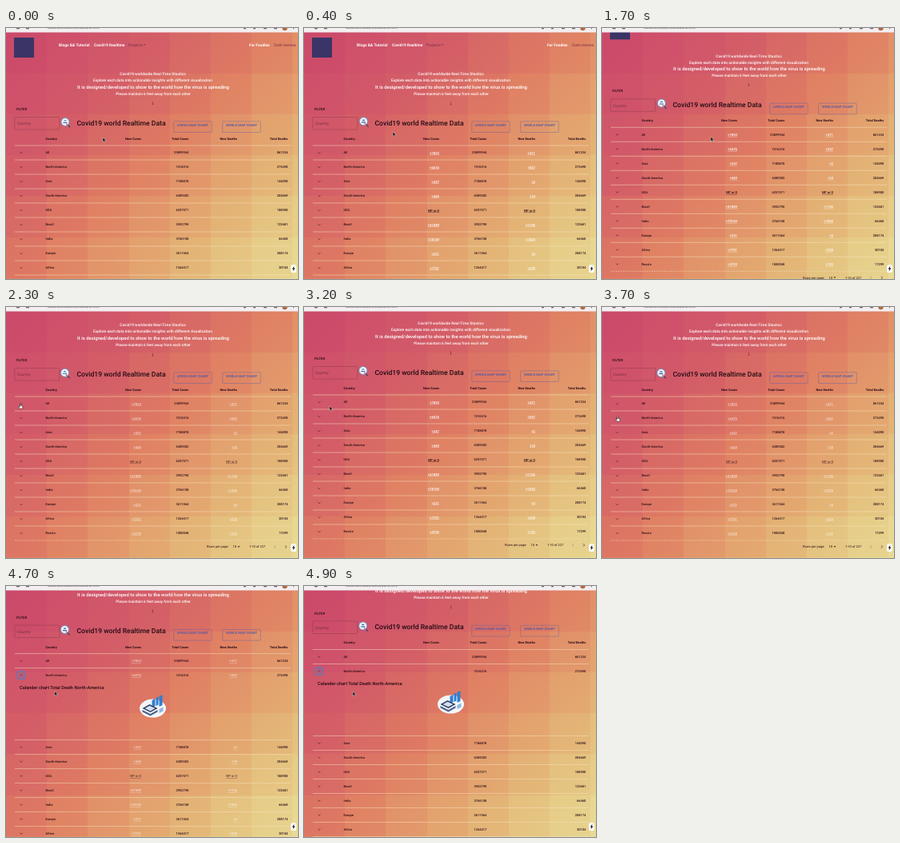
An HTML page for the animation above (5 s loop, 365x314 px).

```html
<!DOCTYPE html>
<html lang="en">
<head>
<meta charset="utf-8">
<title>Covid19 world Realtime Data</title>
<style>
html, body { margin: 0; width: 100%; height: 100%; overflow: hidden; background: #d9705f; }
svg { display: block; width: 365px; height: 314px; }
text { font-family: Roboto, "Liberation Sans", sans-serif; text-rendering: geometricPrecision; white-space: pre; }
.chev { fill: none; stroke: #501c2c; stroke-width: .7; }
</style>
</head>
<body>
<svg id="stage" viewBox="0 0 365 314"></svg>
<script>
const LOOP = 5000, STEP = 100, ROW = 18, PANEL = 72, CELL = 51.2;
const INK = '#2b0d17', DIM = '#7a2f45', BLUE = '#4656ac';

// diagonal colours: [offset, red, green, blue]
const sky = [
  [0, 201, 70, 108], [.28, 211, 91, 104], [.5, 223, 125, 99],
  [.7, 228, 168, 112], [.85, 229, 198, 130], [1, 232, 221, 152]
];

const rows = [
  ['All', '+7853', '25899944', '+471', '861234'],
  ['North-America', '+6476', '7416316', '+557', '273490'],
  ['Asia', '+347', '7188878', '+2', '144090'],
  ['South-America', '+469', '6389282', '+18', '204669'],
  ['USA', 'NP or 0', '6257571', 'NP or 0', '188900'],
  ['Brazil', '+41889', '3952790', '+1156', '122681'],
  ['India', '+78169', '3766108', '+1025', '66460'],
  ['Europe', '+231', '3611564', '+5', '208174'],
  ['Africa', '+7701', '1264417', '+228', '30104'],
  ['Russia', '+4729', '1000048', '+122', '17299']
];

// y is the middle of the capitals
const text = (s, x, y, size, fill, weight = 400, anchor = 'start', more = '') =>
  `<text x="${x}" y="${y + size * .36}" font-size="${size}" fill="${fill}" font-weight="${weight}" text-anchor="${anchor}" ${more}>${s.replace(/&/g, '&amp;')}</text>`;
const rect = (x, y, w, h, more) => `<rect x="${x}" y="${y}" width="${w}" height="${h}" ${more}/>`;
const line = (y, more = '') =>
  `<path d="M11 ${y}H356" stroke="#f6e3c0" stroke-opacity=".6" stroke-width=".8" ${more}/>`;
const blink = (s, x, y) =>
  text(s, x, y, 4.2, s[0] === 'N' ? INK : '#fff', 700, 'end', 'class="blink" text-decoration="underline"');

function tableRow([name, cases, total, deaths, allDeaths], i) {
  const y = 156 + ROW * i;
  return `<path class="chev" ${i === 1 ? 'id="toggle"' : ''} d="M17.5 ${y - .7}l1.5 1.5 1.5-1.5"/>`
    + text(name, 49.5, y, 4, INK, 500) + blink(cases, 169, y)
    + text(total, 228.3, y, 4, INK, 500, 'end') + blink(deaths, 289, y)
    + text(allDeaths, 352.3, y, 4, INK, 500, 'end')
    + line(y + 9, i === 1 ? 'id="split"' : i === 9 ? 'stroke-dasharray="2 1"' : '');
}

function skyColor(u) {
  const i = Math.max(1, sky.findIndex(s => s[0] >= u));
  const a = sky[i - 1], b = sky[i], p = (u - a[0]) / (b[0] - a[0]);
  return `rgb(${[1, 2, 3].map(k => Math.round(a[k] + (b[k] - a[k]) * p))})`;
}

// a smooth diagonal under large, nearly flat squares
function backdrop() {
  let s = rect(0, 0, 365, 314, 'fill="url(#sky)"');
  for (let r = 0; r < 7; r++)
    for (let c = 0; c < 8; c++) {
      const u = Math.min(1, ((c + r + 1) * CELL + 5) / 679);
      s += rect(c * CELL, 5.5 + r * CELL, CELL, CELL, `fill="${skyColor(u)}" fill-opacity=".65" shape-rendering="crispEdges"`);
    }
  return s;
}

const nav = rect(10, 12, 25, 25, 'fill="#3a3566"')
  + text('Blogs && Tutorial', 66, 21, 4.95, '#fff', 700)
  + text('Covid19 Realtime', 110, 21, 4.85, '#fff', 700)
  + text('Projects', 153, 21, 4.9, DIM)
  + `<path d="M172 20.3h2.6l-1.3 1.5z" fill="${DIM}"/>`
  + text('For Foodies', 304, 21, 4.85, '#fff', 700)
  + text('Dark memes', 335, 21, 4.85, DIM);

const intro = text('Covid19 worldwide Real-Time Stastics', 183.5, 57.5, 4.8, '#fff', 500, 'middle')
  + text('Explore each data into actionable insights with different visualization', 183.5, 65.5, 4.85, '#fff', 500, 'middle')
  + text('It is designed/developed to show to the world how the virus is spreading', 184, 73.5, 5.9, '#fff', 500, 'middle')
  + text('Please maintain 6 feet away from each other', 184, 82, 4.7, '#fff', 500, 'middle')
  + `<path id="arrow" d="M183.5 92v4m-.9-1.1l.9 1.1.9-1.1" fill="none" stroke="${DIM}" stroke-width=".6"/>`;

const button = (s, x, w) =>
  rect(x, 116.8, w, 13.7, `rx="1" fill="none" stroke="${BLUE}" stroke-opacity=".5" stroke-width=".7"`)
  + text(s, x + w / 2, 121.3, 4.2, BLUE, 500, 'middle');

const tools = text('FILTER', 13, 101.5, 4.3, INK, 500)
  + rect(10.8, 111.5, 56, 15.5, `rx="1" fill="none" stroke="${DIM}" stroke-opacity=".5" stroke-width=".7"`)
  + text('Country', 14, 119.5, 4.8, DIM)
  + `<g id="lens"><path d="M77.5 121.5l2.6 2.8" stroke="#34466f" stroke-width="1.2"/>
     <circle cx="74" cy="117.5" r="5" fill="#edf4fb" stroke="#5a93c4" stroke-width=".8"/>
     <path d="M71.5 118.5h5M72.5 116h3" stroke="#3b5f92" stroke-width="1.2"/>
     <circle cx="76" cy="120.4" r=".9" fill="#d05566"/></g>`
  + text('Covid19 world Realtime Data', 88.5, 118.7, 8.6, '#240b14', 500)
  + button('AFRICA MAP CHART', 209.7, 47.6) + button('WORLD MAP CHART', 270.7, 47.6);

const head = text('Country', 49.5, 138.5, 4, INK, 700)
  + [['New Cases', 169], ['Total Cases', 228.3], ['New Deaths', 289], ['Total Deaths', 352.3]]
    .map(([s, x]) => text(s, x, 138.5, 4, INK, 700, 'end')).join('')
  + line(147);

const pager = text('Rows per page:', 251, 335, 4, INK)
  + text('10', 283.5, 335, 4, INK) + `<path d="M289.5 334.3h2.8l-1.4 1.5z" fill="${INK}"/>`
  + text('1-10 of 227', 304, 335, 4, INK)
  + `<path class="chev" opacity=".4" d="M337 333.3l-1.7 1.7 1.7 1.7"/><path class="chev" d="M349 333.3l1.7 1.7-1.7 1.7"/>`;

const panel = text('Calander chart Total Death North-America', 17, 189.5, 5.65, '#240b14', 500)
  + `<g transform="translate(183.5 213.5)">
     <ellipse cy="2" rx="16.5" ry="11.5" fill="#f4f6fb"/>
     <path d="M-1-8l4-2v9l-4 2zM4-11l3-1.5v10l-3 1.5zM8-13l4-2v13l-4 2z" fill="#2f7fd0"/>
     <path d="M-13 2l9-5 10 5-9 5z" fill="#2d3a5c"/><path d="M-10 2l6-3.3 7 3.3-6 3.3z" fill="#cfe0f4"/>
     <path d="M-13 4l10 5 9-5v2.5l-9 5-10-5z" fill="#4c648f"/>
     <path d="M8 3l5-2.5v5l-5 2.5z" fill="#8fb6e2"/></g>`;

const bar = rect(0, 0, 365, 5.5, 'fill="#f3eff1"')
  + text('localhost:3000/covidwork.html', 52, -.4, 4.7, '#49434a')
  + '<path d="M13 .6h4M25 .6h4M297 .6h3M309 .6h3M322 .6h4M335 .6h4M359 .6h1" stroke="#6b646c" stroke-width="1.2"/>'
  + '<circle cx="348.5" cy="0" r="3.2" fill="#b5693f"/>';

const bolt = rect(356, 296.3, 7, 9.6, 'rx="2.2" fill="#fff"')
  + '<path d="M360.6 297.6l-3 4h1.7l-.8 2.9 3-4.1h-1.8z" fill="#111"/>';

const pointers = `<g id="pointer">
  <path id="arrowhead" d="M0 0v5.4l1.3-1.2 1 2.1 1-.5-1-2h1.8z" fill="#111" stroke="#fff" stroke-width=".35"/>
  <path id="hand" d="M-.5 0q.7-.8 1.2 0v2.2l2.2.6v2.2l-.8 1.3h-2.6l-2-2.6.6-.6 1.4.8z" fill="#fff" stroke="#111" stroke-width=".55"/></g>`;

const stage = document.getElementById('stage');
stage.innerHTML = `<defs><linearGradient id="sky" gradientUnits="userSpaceOnUse" x1="0" y1="0" x2="339.5" y2="339.5">
  ${sky.map(([u, ...rgb]) => `<stop offset="${u}" stop-color="rgb(${rgb})"/>`).join('')}</linearGradient></defs>
  ${backdrop()}
  <g id="page">${nav}${intro}${tools}${head}${rows.slice(0, 2).map(tableRow).join('')}
  ${rect(14.3, 169.3, 9.4, 9.4, 'id="ring" rx="1.5" fill="#7a6fa0" fill-opacity=".3" stroke="#3f86d6" stroke-width="1"')}
  <g id="panel">${panel}</g>
  <g id="rest">${rows.slice(2).map((r, i) => tableRow(r, i + 2)).join('')}${pager}</g></g>
  ${bar}${bolt}${pointers}`;

const $ = id => document.getElementById(id);
const blinkers = document.querySelectorAll('.blink');
const show = (id, on) => $(id).style.display = on ? '' : 'none';
const move = (id, x, y) => $(id).setAttribute('transform', `translate(${x} ${y})`);

// eased value between [time, value] points
function track(points, t) {
  let i = 1;
  while (i < points.length - 1 && t > points[i][0]) i++;
  const [t0, a] = points[i - 1], [t1, b] = points[i];
  const p = Math.min(1, Math.max(0, (t - t0) / (t1 - t0)));
  return a + (b - a) * p * p * (3 - 2 * p);
}

const scroll = [[1400, 0], [1900, 35], [3000, 35], [3200, 37], [3500, 35], [4400, 35], [4800, 67.5]];
const px = [[0, 121], [400, 111], [1200, 178], [1500, 165], [2200, 18], [2600, 18], [3200, 32], [3800, 18.5], [4050, 18.5], [4400, 60], [4900, 61]];
const py = [[0, 137], [400, 130], [1200, 143], [1500, 140], [2200, 121], [2600, 121], [3200, 124], [3800, 138], [4050, 138], [4400, 131.5], [4900, 132]];

function draw(now) {
  const t = Math.floor(now % LOOP / STEP) * STEP;
  const open = t >= 4500, x = track(px, t);
  move('page', 0, -track(scroll, t));
  move('rest', 0, open ? PANEL : 0);
  $('toggle').setAttribute('transform', open ? 'rotate(180 19 174)' : '');
  move('split', 0, open ? PANEL : 0);
  show('panel', open);
  show('ring', t >= 3900);
  move('lens', .5 * Math.sin(t / 200), .5 * Math.cos(t / 200) - .5);
  move('arrow', 0, .6 * Math.sin(t / 160));

  const glow = 1 - Math.abs(1 - t % 700 / 350);
  blinkers.forEach(b => b.style.opacity = glow);

  const hand = x < 22;
  move('pointer', x, track(py, t));
  show('hand', hand);
  show('arrowhead', !hand);
  requestAnimationFrame(draw);
}
draw(0);
</script>
</body>
</html>
```
